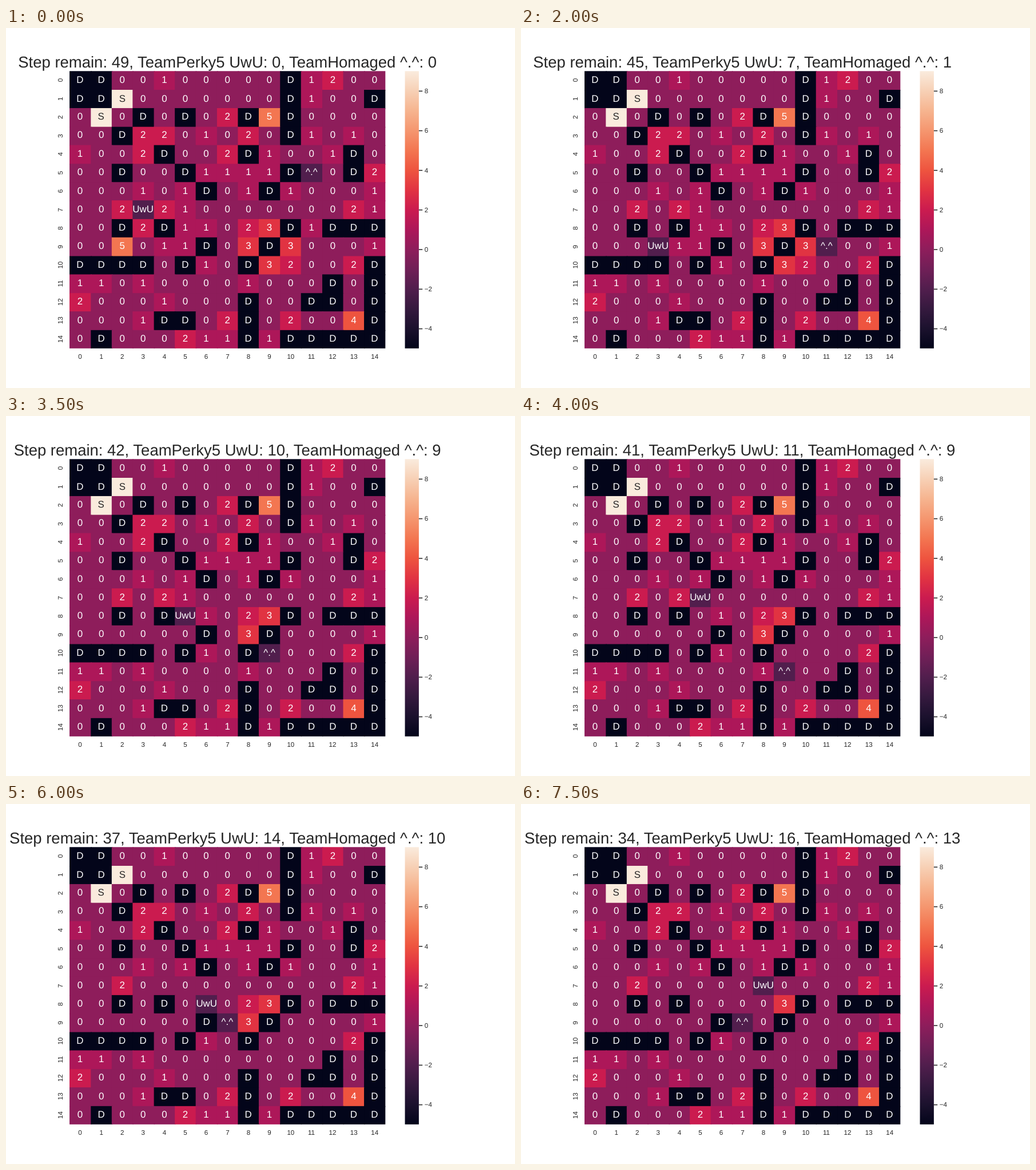
An HTML page with a canvas for the animation above (8000 ms loop, 890 px wide and 629 px high).

```html
<!DOCTYPE html>
<html lang="en">
<head>
<meta charset="utf-8">
<title>Grid game</title>
<style>
  html, body { margin: 0; width: 100%; height: 100%; overflow: hidden; background: #fff; }
  canvas { display: block; }
</style>
</head>
<body>
<canvas id="stage" width="890" height="629"></canvas>
<script>
const ctx = document.getElementById('stage').getContext('2d');
const FONT = '"Liberation Sans", Arial, sans-serif';
const INK = '#262626';
const STEP_MS = 500, STEPS = 16, SIZE = 15;

// The plot is laid out on a 1170 x 827 figure and scaled to the stage
const W = 1170, H = 827, PT = 100 / 72;
const LEFT = 0.125 * W, RIGHT = 0.745 * W;
const TOP = 0.12 * H, BOTTOM = 0.89 * H;
const CELL_W = (RIGHT - LEFT) / SIZE, CELL_H = (BOTTOM - TOP) / SIZE;
const BAR_X = 917, BAR_W = 32, TICK = 6 * PT, PAD = 3.5 * PT;
const TITLE = 26 * PT, MARK = 16 * PT, LABEL = 11 * PT;
const MIN = -5, MAX = 9;

// One colour for each whole value from MIN to MAX
const RAMP = ['#03051a', '#1b112d', '#35193e', '#511e4d', '#701f57',
  '#8e1d5b', '#ad1759', '#cb1b4f', '#e13342', '#ee543f',
  '#f37651', '#f5966f', '#f6b48f', '#f7d0b5', '#faebdd'];

const BOARD = [
  'DD00100000D1200',
  'DDS0000000D100D',
  '0S0D0D02D5D0000',
  '00D2201020D1010',
  '1002D002D1001D0',
  '00D00D1111D00D2',
  '000101D01D10001',
  '002021000000021',
  '00D2D11023D1DDD',
  '005011D03D30001',
  'DDDD0D10D32002D',
  '110100001000D0D',
  '20001000D00DD0D',
  '0001DD02D02004D',
  '0D000211D1DDDDD'
];

const BOTS = [
  { face: 'UwU', row: 7, col: 3, path: 'DDLRRRUULRRDRRU' },
  { face: '^.^', row: 5, col: 11, path: 'DDDDLDLDLLUUR.L' }
];
const MOVES = { U: [-1, 0], D: [1, 0], L: [0, -1], R: [0, 1], '.': [0, 0] };

const edgeX = c => Math.round(LEFT + c * CELL_W);
const edgeY = r => Math.round(TOP + r * CELL_H);
const midX = c => LEFT + (c + 0.5) * CELL_W;
const midY = r => TOP + (r + 0.5) * CELL_H;

function play(steps) {
  const grid = BOARD.map(row => [...row]);
  const bots = BOTS.map(b => ({ ...b, score: 0 }));
  for (let i = 0; i < steps; i++) {
    for (const b of bots) {
      const [dr, dc] = MOVES[b.path[i]];
      b.row += dr;
      b.col += dc;
      b.score += Number(grid[b.row][b.col]);
      grid[b.row][b.col] = '0';
    }
  }
  for (const b of bots) grid[b.row][b.col] = b.face;
  return { grid, bots };
}

function valueOf(mark) {
  if (mark === 'D') return MIN;
  if (mark === 'S') return MAX;
  return mark.length > 1 ? -2 : Number(mark);
}

// Text starts on a whole figure pixel; align 0.5 centres it on x
function text(str, x, y, size, color = INK, align = 0.5) {
  ctx.font = size + 'px ' + FONT;
  ctx.fillStyle = color;
  const left = x - ctx.measureText(str).width * align;
  ctx.fillText(str, Math.round(left), Math.round(y));
}

function drawGrid(grid) {
  // Cells reach under their neighbours so no seams show
  grid.forEach((row, r) => row.forEach((mark, c) => {
    const x = edgeX(c), y = edgeY(r);
    ctx.fillStyle = RAMP[valueOf(mark) - MIN];
    ctx.fillRect(x, y, Math.min(edgeX(c + 1) + 2, edgeX(SIZE)) - x,
      Math.min(edgeY(r + 1) + 2, edgeY(SIZE)) - y);
  }));
  grid.forEach((row, r) => row.forEach((mark, c) => {
    text(mark, midX(c), midY(r) + 5.6, MARK, mark === 'S' ? INK : '#fff');
  }));
}

function drawAxes() {
  for (let i = 0; i < SIZE; i++) {
    text(i, midX(i), BOTTOM + TICK + PAD + 11, LABEL);
    ctx.save();
    ctx.translate(Math.round(LEFT - TICK - PAD - 3), Math.round(midY(i)));
    ctx.rotate(-Math.PI / 2);
    text(i, 0, 0, LABEL);
    ctx.restore();
  }
}

function drawBar() {
  const fade = ctx.createLinearGradient(0, BOTTOM, 0, TOP);
  RAMP.forEach((color, i) => fade.addColorStop(i / (RAMP.length - 1), color));
  ctx.fillStyle = fade;
  ctx.fillRect(BAR_X, edgeY(0), BAR_W, edgeY(SIZE) - edgeY(0));
  for (let v = -4; v <= 8; v += 2) {
    const y = BOTTOM - (v - MIN) / (MAX - MIN) * (BOTTOM - TOP);
    ctx.fillStyle = INK;
    ctx.fillRect(BAR_X + BAR_W, Math.round(y) - 1, TICK, 2);
    text(v < 0 ? '\u2212' + -v : v, BAR_X + BAR_W + TICK + PAD, y + 5.5,
      LABEL, INK, 0);
  }
}

function draw(step) {
  const { grid, bots: [a, b] } = play(step);
  ctx.setTransform(890 / W, 0, 0, 629 / H, 0, 0);
  ctx.textRendering = 'geometricPrecision';
  ctx.fillStyle = '#fff';
  ctx.fillRect(0, 0, W, H);
  drawGrid(grid);
  drawAxes();
  drawBar();
  text(`Step remain: ${49 - step}, TeamPerky5 ${a.face}: ${a.score}, ` +
    `TeamHomaged ${b.face}: ${b.score}`, (LEFT + RIGHT) / 2, TOP - TICK, TITLE);
}

let shown = -1;
const start = performance.now();
function tick() {
  const step = Math.floor((performance.now() - start) / STEP_MS) % STEPS;
  if (step !== shown) draw(shown = step);
  requestAnimationFrame(tick);
}
tick();
</script>
</body>
</html>
```
